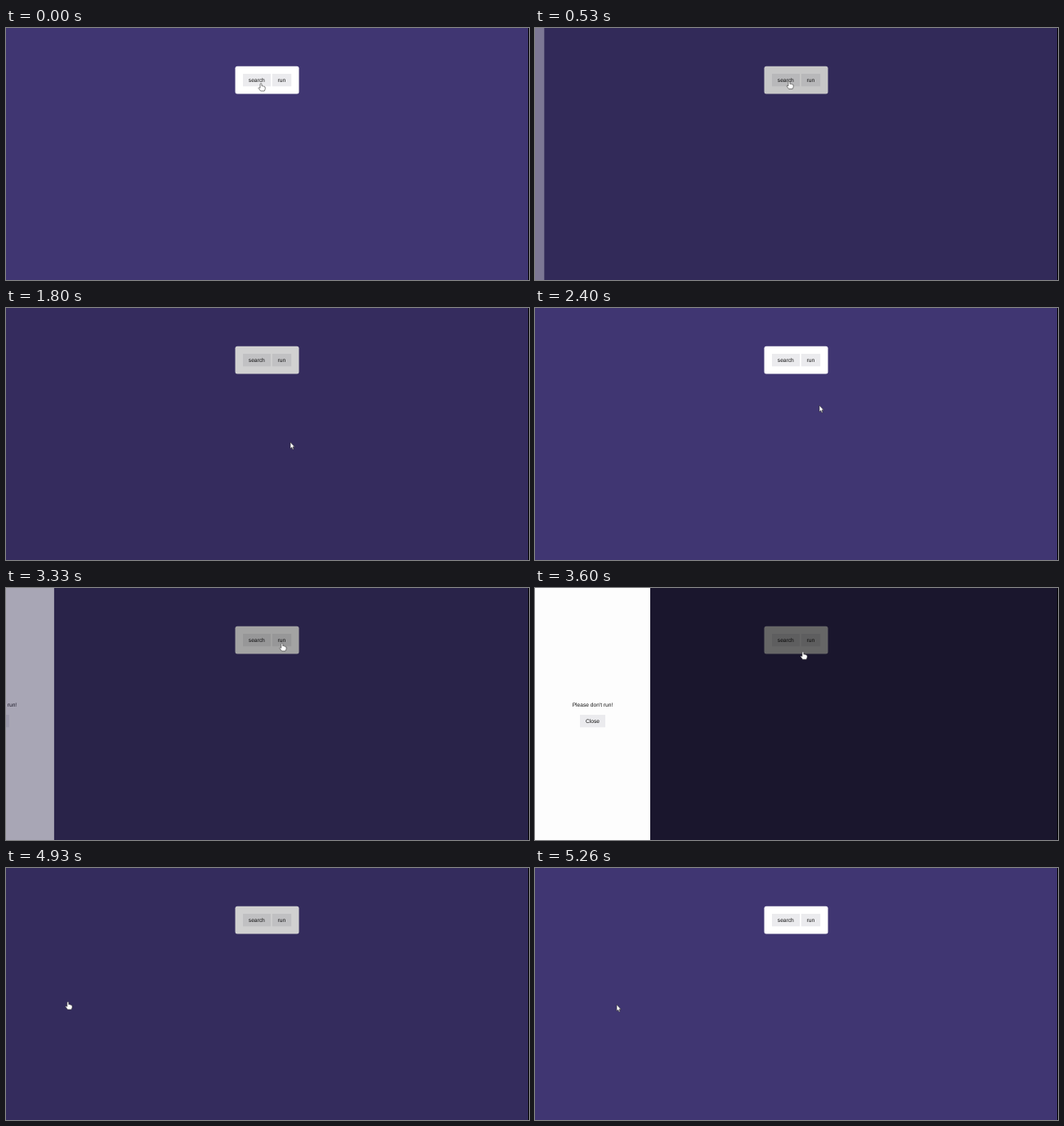
Write an HTML page that moves like this. It is 640 px wide and 308 px high and loops after 5.33 s.

```html
<!DOCTYPE html>
<html lang="en">
<head>
<meta charset="utf-8">
<title>Drawers</title>
<style>
  html, body { margin: 0; width: 100%; height: 100%; overflow: hidden; background: #403672; }
  svg { display: block; width: 100%; height: 100%; }
  text { font: 6.65px "Liberation Sans", Arial, sans-serif; fill: #111; text-anchor: middle; text-rendering: geometricPrecision; }
  .button { fill: #ebebee; }
  .panel { fill: #fdfdfd; }
  #cursor path { fill: #fff; stroke: #333; stroke-width: .6; stroke-linejoin: round; }
</style>
</head>
<body>
<svg viewBox="0 0 640 308">
  <rect width="640" height="308" fill="#403672"/>
  <rect x="280.5" y="46.8" width="78" height="33.8" rx="2.5" fill="#fff"/>
  <rect class="button" x="290" y="56" width="34" height="15.3"/>
  <text x="306.8" y="66">search</text>
  <rect class="button" x="325.7" y="56" width="23.5" height="15.3"/>
  <text x="337.3" y="66">run</text>
  <rect id="shade" width="640" height="308"/>
  <g id="found">
    <rect class="panel" width="141" height="308"/>
    <text x="70.5" y="144.5">Whoa! you found me!</text>
    <rect class="button" x="49" y="155" width="43" height="15.3"/>
    <text x="70.5" y="165">Hide back</text>
  </g>
  <g id="please">
    <rect class="panel" width="141" height="308"/>
    <text x="70.5" y="144.5">Please don't run!</text>
    <rect class="button" x="55" y="155" width="31" height="15.3"/>
    <text x="70.5" y="165">Close</text>
  </g>
  <rect x="639" width="1" height="308"/>
  <g id="cursor">
    <path id="arrow" d="M0 0V7.8L1.7 6.3 2.9 9 4.1 8.5 3 5.8H5.2Z"/>
    <path id="hand" d="M-1 .8Q0-.6 1 .8V3.4Q2 2.8 2.6 3.6 3.6 3.2 4 4.2 5.2 4 5.2 5.4V7L4.2 9.5H-.4L-3 6Q-3 4.6-1 5.8Z"/>
  </g>
</svg>
<script>
const LOOP = 5330, STEP = 1000 / 15, TRAVEL = 205;
const get = id => document.getElementById(id);

// Opening and closing: start and duration in ms
const drawers = [
  { node: get("found"), open: [328, 500], close: [1500, 470] },
  { node: get("please"), open: [3050, 500], close: [4700, 370] }
];

// Pointer path: time, x, y, shape from that time on
const pointer = [
  [0, 312, 67.5, "hand"],
  [133, 311, 65, "hand"],
  [867, 311, 65, "hand"],
  [933, 338, 138, "arrow"],
  [1000, 348, 164, "arrow"],
  [2333, 348, 164, "arrow"],
  [2400, 348, 119, "arrow"],
  [2533, 346, 84, "arrow"],
  [2667, 341, 70, "hand"],
  [2867, 337.8, 67.5, "hand"],
  [3533, 337.8, 67.5, "hand"],
  [3667, 318, 88, "arrow"],
  [4000, 125, 147, "arrow"],
  [4133, 81, 156, "hand"],
  [4400, 75.8, 163.5, "hand"],
  [5133, 75.8, 163.5, "hand"],
  [5200, 88, 165, "arrow"],
  [5266, 100, 167, "arrow"]
];

function ease(time, [start, duration]) {
  const x = Math.min(1, Math.max(0, (time - start) / duration));
  return x * x * (3 - 2 * x);
}

function movePointer(time) {
  const i = pointer.findLastIndex(key => key[0] <= time + 1);
  const from = pointer[i], to = pointer[i + 1] || from;
  const k = to === from ? 0 : Math.max(0, (time - from[0]) / (to[0] - from[0]));
  const mix = n => from[n] + (to[n] - from[n]) * k;
  get("cursor").setAttribute("transform", `translate(${mix(1)} ${mix(2)})`);
  for (const shape of ["arrow", "hand"])
    get(shape).style.display = from[3] === shape ? "" : "none";
}

function draw(now) {
  const time = Math.floor((now % LOOP + 7) / STEP) * STEP % LOOP;
  let shade = 0;
  for (const { node, open, close } of drawers) {
    const shown = ease(time, open) - ease(time, close);
    node.setAttribute("transform", `translate(${-TRAVEL * (1 - shown)} 0)`);
    node.setAttribute("opacity", shown);
    shade += shown;
  }
  get("shade").setAttribute("opacity", shade * .6);
  movePointer(time);
}

let begin;
function tick(now) {
  begin ??= now;
  draw(now - begin);
  requestAnimationFrame(tick);
}
draw(0);
requestAnimationFrame(tick);
</script>
</body>
</html>
```
